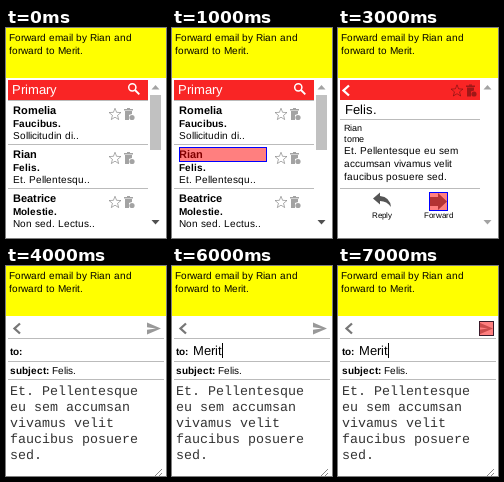
Recreate the animation shown at these times as an HTML page with a canvas. Size 160 by 210 pixels, loop 8 s.

```html
<!DOCTYPE html>
<html lang="en">
<head>
<meta charset="utf-8">
<title>Forward an email</title>
<style>
  html, body { margin: 0; width: 100%; height: 100%; overflow: hidden; background: #fff; }
  canvas { display: block; width: 160px; height: 210px; }
</style>
</head>
<body>
<canvas id="stage"></canvas>
<script>
const WIDTH = 160, HEIGHT = 210, STEP = 1000, STEPS = 8;
const SANS = '"Liberation Sans", Arial, sans-serif';
const MONO = '"Liberation Mono", monospace';
const RED = '#f92525', RULE = '#bbb', BLUE = '#00f', DARK = '#3a1a2a';
const SENDER = 'Rian', RECIPIENT = 'Merit', SUBJECT = 'Felis.';

const mails = [
  ['Romelia', 'Faucibus.', 'Sollicitudin di..'],
  [SENDER, SUBJECT, 'Et. Pellentesqu..'],
  ['Beatrice', 'Molestie.', 'Non sed. Lectus..']
];

const canvas = document.getElementById('stage');
const ctx = canvas.getContext('2d');
const ratio = window.devicePixelRatio || 1;
canvas.width = WIDTH * ratio;
canvas.height = HEIGHT * ratio;
ctx.scale(ratio, ratio);
ctx.textRendering = 'geometricPrecision';

function rect(x, y, w, h, color) {
  ctx.fillStyle = color;
  ctx.fillRect(x, y, w, h);
}

// Advances by whole pixels, as hinted screen text does; returns the end position.
function text(str, x, y, size, { bold = false, color = '#000', family = SANS } = {}) {
  ctx.font = `${bold ? 'bold ' : ''}${size}px ${family}`;
  ctx.fillStyle = color;
  for (const char of str) {
    ctx.fillText(char, x, y);
    x += Math.round(ctx.measureText(char).width);
  }
  return x;
}

function trace(points, close) {
  ctx.beginPath();
  points.forEach(([x, y]) => ctx.lineTo(x, y));
  if (close) ctx.closePath();
}

function line(points, color, width, close = false) {
  trace(points, close);
  ctx.strokeStyle = color;
  ctx.lineWidth = width;
  ctx.stroke();
}

function polygon(points, color) {
  trace(points, true);
  ctx.fillStyle = color;
  ctx.fill();
}

function highlight(x, y, w, h, border) {
  rect(x, y, w, h, 'rgba(255,0,0,.5)');
  ctx.strokeStyle = border;
  ctx.lineWidth = 1;
  ctx.strokeRect(x + .5, y + .5, w - 1, h - 1);
}

function star(cx, cy) {
  const points = Array.from({ length: 10 }, (_, i) => {
    const angle = -Math.PI / 2 + i * Math.PI / 5;
    const r = i % 2 ? 2.7 : 6.2;
    return [cx + r * Math.cos(angle), cy + .5 + r * Math.sin(angle)];
  });
  line(points, 'rgba(0,0,0,.36)', .9, true);
}

function trash(cx, cy) {
  const color = 'rgba(0,0,0,.36)';
  rect(cx - 5, cy - 5, 9, 1.5, color);
  rect(cx - 2, cy - 6, 3, 1, color);
  polygon([[cx - 4, cy - 3], [cx + 3, cy - 3], [cx + 3, cy], [cx, cy + 1],
    [cx, cy + 6], [cx - 4, cy + 6]], color);
  ctx.beginPath();
  ctx.arc(cx + 3, cy + 3.5, 2.6, 0, Math.PI * 2);
  ctx.fill();
}

function searchIcon() {
  ctx.strokeStyle = '#fff';
  ctx.lineWidth = 1.5;
  ctx.beginPath();
  ctx.arc(126.3, 59.3, 3.6, 0, Math.PI * 2);
  ctx.stroke();
  line([[129, 62], [133.3, 66.3]], '#fff', 1.9);
}

function chevron(x, y, color) {
  line([[x + 5.5, y - 5], [x, y], [x + 5.5, y + 5]], color, 2.3);
}

function scrollbar(scrollable) {
  const off = '#a3a3a3';
  polygon([[149.5, 57], [153.5, 61.5], [145.5, 61.5]], off);
  polygon([[145.5, 192], [153.5, 192], [149.5, 196.5]], scrollable ? '#505050' : off);
  if (scrollable) rect(144, 67, 11, 55, '#c1c1c1');
}

function inbox() {
  rect(2, 52, 140, 20, RED);
  text('Primary', 6, 66, 13, { color: '#fff' });
  searchIcon();
  mails.forEach(([name, subject, preview], i) => {
    const y = 72 + i * 44;
    rect(2, y, 140, 1, RULE);
    text(name, 7, y + 14, 11, { bold: true });
    text(subject, 7, y + 27, 10, { bold: true });
    text(preview, 7, y + 39, 10);
    star(109, y + 14);
    trash(123, y + 14);
  });
  scrollbar(true);
}

function replyIcon() {
  ctx.fillStyle = '#555';
  ctx.beginPath();
  ctx.moveTo(35, 170.5);
  ctx.lineTo(42, 164.5);
  ctx.lineTo(42, 168);
  ctx.quadraticCurveTo(52, 169, 53, 179);
  ctx.quadraticCurveTo(49, 173, 42, 173);
  ctx.lineTo(42, 176.5);
  ctx.fill();
}

function forwardIcon() {
  polygon([[92, 169], [100, 169], [100, 165], [109, 173.5], [100, 182],
    [100, 178], [92, 178]], '#666');
}

function message() {
  rect(2, 52, 140, 20, RED);
  chevron(5.5, 62.5, '#fff');
  star(119, 62.5);
  trash(133, 62.5);
  text(SUBJECT, 7, 86, 13);
  rect(2, 91, 140, 1, RULE);
  text(SENDER, 6, 103, 9);
  text('tome', 6, 114, 9);
  ['Et. Pellentesque eu sem', 'accumsan vivamus velit', 'faucibus posuere sed.']
    .forEach((row, i) => text(row, 6, 126 + i * 13, 10));
  rect(2, 160, 140, 1, RULE);
  replyIcon();
  forwardIcon();
  text('Reply', 34, 190, 8);
  text('Forward', 86, 190, 8);
  scrollbar(false);
}

function compose(recipient) {
  chevron(8.5, 62.5, '#777');
  polygon([[141, 56.5], [155, 62.5], [141, 68.5], [141, 63.8], [150, 62.5], [141, 61.2]], '#999');
  for (const y of [72, 95, 113]) rect(2, y, 156, 1, RULE);
  text('to:', 4, 89, 10, { bold: true });
  text('subject:', 4, 108, 10, { bold: true });
  text(SUBJECT, 46, 108, 10);
  ['Et. Pellentesque', 'eu sem accumsan', 'vivamus velit', 'faucibus posuere', 'sed.']
    .forEach((row, i) => text(row, 4, 129 + i * 16, 13.333, { family: MONO, color: '#333' }));
  line([[149, 210], [156, 203]], '#888', 1);
  line([[153, 210], [156, 207]], '#888', 1);
  if (recipient) {
    const end = text(recipient, 21, 89, 13);
    rect(end, 77, 1, 15, '#000');
  }
}

function draw(step) {
  rect(0, 0, WIDTH, HEIGHT, '#fff');
  rect(0, 0, WIDTH, 50, '#ff0');
  text(`Forward email by ${SENDER} and`, 3, 13, 10);
  text(`forward to ${RECIPIENT}.`, 3, 26, 10);

  if (step < 2) inbox();
  else if (step < 4) message();
  else compose(step >= 6 ? RECIPIENT : '');

  if (step === 1) highlight(7, 119, 88, 15, BLUE);
  if (step === 3) highlight(91, 164, 19, 19, BLUE);
  if (step === 5) highlight(19, 75, 125, 19, DARK);
  if (step === 7) highlight(141, 55, 15, 15, DARK);
}

function frame() {
  draw(Math.floor(performance.now() / STEP) % STEPS);
  requestAnimationFrame(frame);
}
frame();
</script>
</body>
</html>
```
